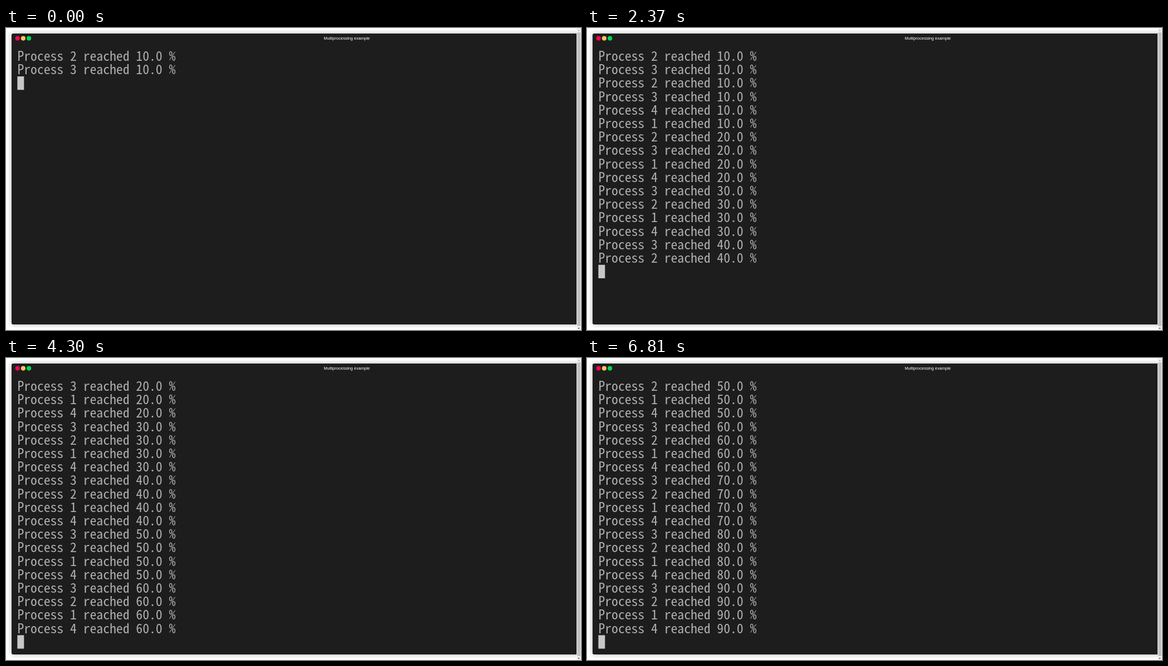
Write an HTML page that moves like this. It is 1032 by 543 pixels and loops after 7800 ms.

```html
<!DOCTYPE html>
<html lang="en">
<head>
<meta charset="utf-8">
<title>Multiprocessing example</title>
<style>
  html, body { margin: 0; width: 100%; height: 100%; overflow: hidden; background: #fff; }
  #stage { position: relative; width: 1032px; height: 543px; overflow: hidden; }
  #window {
    position: absolute; left: 9.7px; top: 9.7px; width: 1203.6px; height: 523.6px;
    border-radius: 3px; background: #1d1d1d; box-shadow: 0 0 9px rgba(0, 0, 0, .33);
  }
  svg { position: absolute; left: 0; top: 0; display: block; }
  .title { font: 7.54px "Liberation Sans", Arial, sans-serif; fill: #fff; text-anchor: middle; }
  #rows {
    font: 23.67px "Noto Sans Mono CJK JP", "Noto Sans Mono CJK SC", "Noto Sans Mono CJK KR", monospace;
    fill: #afafaf;
  }
</style>
</head>
<body>
<div id="stage">
  <div id="window"></div>
  <svg width="1032" height="543" viewBox="0 0 1032 543">
    <circle cx="20.7" cy="18.6" r="4.1" fill="#ff0057"/>
    <circle cx="30.9" cy="18.6" r="4.1" fill="#f9c859"/>
    <circle cx="41.1" cy="18.6" r="4.1" fill="#00d95a"/>
    <text class="title" x="611.6" y="21.4">Multiprocessing example</text>
    <g id="rows"></g>
    <rect id="cursor" x="20.4" width="11.9" height="24.2" fill="#c7c7c7"/>
    <rect x="1024" width="8" height="543" fill="#f1f1f1"/>
    <rect x="1025" y="8" width="6" height="528" fill="#c1c1c1"/>
    <path d="M1026 5.4h4l-2-2.2z" fill="#a3a3a3"/>
    <path d="M1026 539h4l-2 2.2z" fill="#505050"/>
  </svg>
</div>
<script>
const LOOP = 7800, ROWS = 19, PITCH = 24.2, TOP = 38.6;

// [time in ms, lines printed so far]
const STEPS = [
  [0, 2], [250, 6], [760, 8], [990, 9], [1010, 10], [1510, 12], [1750, 13], [1770, 14],
  [2270, 15], [2370, 16], [2610, 17], [2640, 18], [3150, 19], [3250, 20], [3510, 22],
  [4030, 24], [4270, 25], [4300, 26], [5070, 30], [5630, 32], [5870, 34],
  [6440, 35], [6540, 36], [6810, 38]
];

const FIRST = "2323412314", CYCLE = "3214";

function line(i) {
  const id = i < 10 ? FIRST[i] : CYCLE[(i - 10) % 4];
  const percent = 10 + 10 * Math.max(0, Math.floor((i - 2) / 4));
  return `Process ${id} reached ${percent}.0 %`;
}

const group = document.getElementById("rows");
const cursor = document.getElementById("cursor");
const rows = Array.from({ length: ROWS }, (_, r) => {
  const row = document.createElementNS("http://www.w3.org/2000/svg", "text");
  row.setAttribute("x", 20.4);
  row.setAttribute("y", TOP + 20.4 + r * PITCH);
  return group.appendChild(row);
});

let shown = -1;

function show(count) {
  if (count === shown) return;
  shown = count;
  const start = Math.max(0, count - ROWS);
  rows.forEach((row, r) => {
    row.textContent = start + r < count ? line(start + r) : "";
  });
  cursor.setAttribute("y", TOP + Math.min(count, ROWS) * PITCH);
}

function frame() {
  const t = performance.now() % LOOP;
  show(STEPS.filter(([at]) => at <= t).pop()[1]);
  requestAnimationFrame(frame);
}
frame();
</script>
</body>
</html>
```
